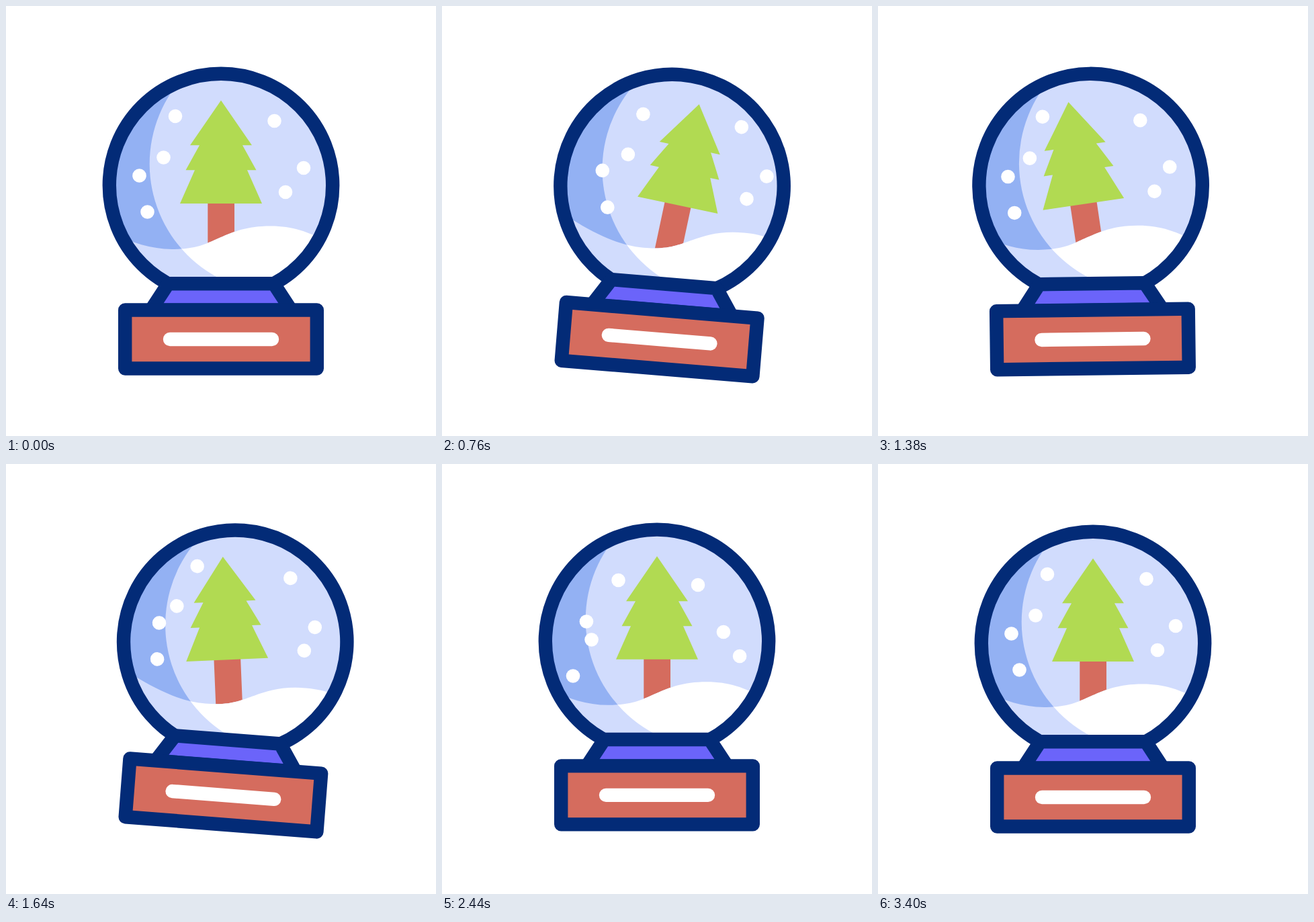
An HTML page that plays this animation: 640x640 px, repeating every 3.6 s.

```html
<!DOCTYPE html>
<html lang="en">
<head>
<meta charset="utf-8">
<title>Snow globe</title>
<style>
  html, body { margin: 0; width: 100%; height: 100%; overflow: hidden; background: #fff; }
  svg { display: block; width: 100vw; height: 100vh; }
</style>
</head>
<body>
<svg viewBox="0 0 640 640">
  <defs>
    <clipPath id="glass"><circle cx="320" cy="267" r="160"/></clipPath>
    <clipPath id="lit"><circle cx="405.2" cy="235" r="191.5"/></clipPath>
    <path id="dune" d="M60 290L140 330C170 345 208 362 247 362S299 353 319 344.5S358 327.5 394 327.5S455 338 490 357L560 395V480H60Z"/>
  </defs>
  <g id="globe">
    <g clip-path="url(#glass)">
      <circle cx="320" cy="267" r="162" fill="#93b1f3"/>
      <circle cx="405.2" cy="235" r="191.5" fill="#d1dcfd"/>
      <g id="tree">
        <path d="M300.3 290H340V385H300.3Z" fill="#d56c5e"/>
        <path d="M320 140.5L366 207.3H352L372.5 244.3H359L381 294H259L281 244.3H267.5L288 207.3H274Z" fill="#b1da52"/>
      </g>
      <use class="snow" href="#dune" fill="#d1dcfd"/>
      <g clip-path="url(#lit)"><use class="snow" href="#dune" fill="#fff"/></g>
      <g id="flakes" fill="#fff"></g>
    </g>
    <g stroke="#032b77" stroke-width="20.4" stroke-linejoin="round">
      <circle cx="320" cy="267" r="166.2" fill="none"/>
      <path d="M215.5 452.8L241.5 413.2H398.5L424.5 452.8Z" fill="#6b64fa"/>
      <path d="M177.2 452.5H462.8V539.5H177.2Z" fill="#d56c5e"/>
    </g>
    <path d="M244 496H396" stroke="#fff" stroke-width="20.4" stroke-linecap="round"/>
  </g>
</svg>
<script>
const LOOP = 3600;
const BEAT = 400;           // one swing of the globe
const SHAKE_END = 4 * BEAT; // then it settles and hops
const HOP_END = 2800;
const TILT = 5;
const NS = 'http://www.w3.org/2000/svg';
const globe = document.getElementById('globe');
const tree = document.getElementById('tree');
const flakeBox = document.getElementById('flakes');
const snow = document.querySelectorAll('.snow');

// rest x, rest y, sideways drift
const FLAKES = [
  [252, 164, 7], [234.5, 225.5, -13], [198.5, 252.5, 16], [210.5, 306.5, -10.3],
  [399.5, 171, -12.3], [443, 241, -16], [416, 277, 18]
];

const clamp = p => Math.max(0, Math.min(1, p));
const ease = (t, from, length) => {
  const p = clamp((t - from) / length);
  return p * p * (3 - 2 * p);
};
const settle = t => 1 - ease(t, SHAKE_END, BEAT / 2);

// Alternating swings: left on odd beats, right on even ones
function tiltAt(t) {
  if (t >= SHAKE_END) return TILT * settle(t);
  const beat = Math.floor(t / BEAT);
  const p = ease(t, beat * BEAT, BEAT);
  if (beat === 0) return -TILT * p;
  return TILT * (beat % 2 ? 2 * p - 1 : 1 - 2 * p);
}

// The tree exaggerates the tilt, then stays left until the globe settles
function leanAt(t) {
  return 1.54 * (t < 3 * BEAT ? tiltAt(t) : -TILT * settle(t));
}

// Three equal hops
function hopAt(t) {
  if (t < SHAKE_END || t > HOP_END) return 0;
  const phase = (t - SHAKE_END) % BEAT / (BEAT / 2);
  return -29 * ease(phase < 1 ? phase : 2 - phase, 0, 1);
}

// Flakes lag behind the shake, a little less each time
function swayAt(t) {
  const held = Math.min(t, 3 * BEAT);
  return tiltAt(held) * (4.25 - held / 920) * (1 - ease(t, 3 * BEAT, 260));
}

function addFlake() {
  const c = document.createElementNS(NS, 'circle');
  c.setAttribute('r', 10.3);
  return flakeBox.appendChild(c);
}
const floating = FLAKES.map(addFlake);
const falling = FLAKES.map(addFlake);

function place(c, x, y, alpha) {
  c.setAttribute('cx', x);
  c.setAttribute('cy', y);
  c.setAttribute('opacity', alpha);
}

function drawFlakes(t) {
  const d = t - 2100;
  const drift = t > 1274 ? 1 + 0.0014 * d + 2.3e-7 * d * d : 0;
  const sink = t > 1452 ? 4.73e-5 * (t - 1817) ** 2 - 6.3 : 0;
  const sway = swayAt(t);
  const fade = 1 - clamp((t - 2600) / 330);
  const away = 1 - ease(t, 2750, 650);
  FLAKES.forEach(([x, y, side], i) => {
    place(floating[i], x + sway + side * drift, y + sink, fade);
    place(falling[i], x + 0.26 * (320 - x) * away, y - 155.5 * away, t >= 2740 ? 1 : 0);
  });
}

function draw(t) {
  const tilt = tiltAt(t);
  globe.setAttribute('transform', `translate(0 ${hopAt(t)}) rotate(${tilt} 320 540)`);
  tree.setAttribute('transform', `rotate(${leanAt(t)} 320 377)`);
  snow.forEach(s => s.setAttribute('transform', `translate(${tilt * 8} 0)`));
  drawFlakes(t);
}

const start = performance.now();
function tick() {
  draw((performance.now() - start) % LOOP);
  requestAnimationFrame(tick);
}
draw(0);
requestAnimationFrame(tick);
</script>
</body>
</html>
```
